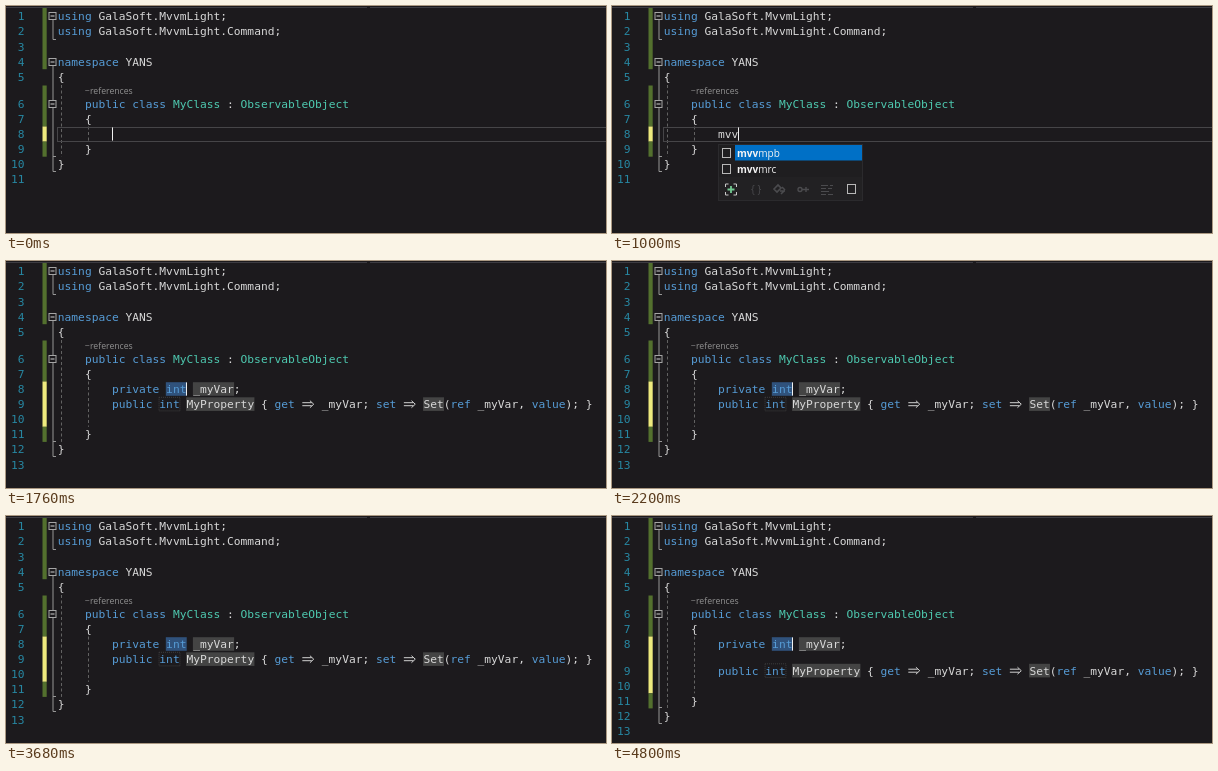
Recreate the animation shown at these times as an HTML page. Size 600 by 227 pixels, loop 4840 ms.

```html
<!DOCTYPE html>
<html lang="en">
<head>
<meta charset="utf-8">
<title>Snippet expansion</title>
<style>
  html, body { margin: 0; width: 100%; height: 100%; overflow: hidden; background: #1c1a1d; }
  svg { display: block; width: 600px; height: 227px; }
  text { white-space: pre; }
  .code { font: 11.25px "DejaVu Sans Mono", "Noto Sans Mono", monospace; font-variant-ligatures: none; }
  .lens { font: 8.7px "Open Sans", "Noto Sans", sans-serif; }
  .item { font: 10px "Open Sans", "Noto Sans", sans-serif; }
  .hit { font-weight: 700; }
</style>
</head>
<body>
<svg id="stage" viewBox="0 0 600 227" width="600" height="227"></svg>
<script>
const LOOP = 4840, BLINK = 650;
const CH = 6.77, LEFT = 51.8, ROW = 15.1, LENS = 12;
const CODE_X = LEFT + 8 * CH;
const TYPED = [[520, 'm'], [600, 'mv'], [680, 'mvv'], [1160, 'mvvmpb']];
const POPUP = [600, 1160];
const EXPAND = 1640, SHIFT = 3960;

const HEAD = [
  'using GalaSoft.MvvmLight;',
  'using GalaSoft.MvvmLight.Command;',
  '',
  'namespace YANS',
  '{',
  '    public class MyClass : ObservableObject',
  '    {'
];
const BODY = [
  '        private int _myVar;',
  '        public int MyProperty { get => _myVar; set => Set(ref _myVar, value); }',
  ''
];
const TAIL = ['    }', '}', ''];

const KEYWORD = /^(using|namespace|public|private|class|int|get|set|ref|value)$/;
const TYPE = /^(MyClass|ObservableObject)$/;
const stage = document.getElementById('stage');

const rect = (x, y, w, h, fill, extra = '') =>
  `<rect x="${x}" y="${y}" width="${w}" height="${h}" fill="${fill}" ${extra}/>`;
const path = (d, color, extra = '') =>
  `<path d="${d}" fill="none" stroke="${color}" ${extra}/>`;
const text = (cls, x, y, fill, s) =>
  `<text class="${cls}" x="${x.toFixed(2)}" y="${y.toFixed(2)}" fill="${fill}">${s}</text>`;

function arrow(x, y) {
  return path(`M${x + 0.8} ${y - 1.4}h9.4M${x + 0.8} ${y + 1.6}h9.4M${x + 8.4} ${y - 3.4}l3.8 3.5l-3.8 3.5`, '#d0d0d0');
}

function codeLine(line, y) {
  let out = '';
  for (const m of line.matchAll(/=>|\w+|[^\w\s=]+/g)) {
    const x = LEFT + m.index * CH, word = m[0];
    if (word === '=>') { out += arrow(x, y); continue; }
    const color = KEYWORD.test(word) ? '#569cd6' : TYPE.test(word) ? '#4ec9b0' : '#d8d8d8';
    out += text('code', x, y + 4, color, word);
  }
  return out;
}

// Vertical centre of a 1-based line
const lineY = (n, shift) => 10.3 + ROW * (n - 1) + (n > 5 ? LENS : 0) + (n > 8 ? shift : 0);

function foldBox(y) {
  const t = Math.round(y) - 3.5;
  return rect(43, t, 7, 7, '#1c1a1d', 'stroke="#a5a5a5"') + path(`M44.5 ${t + 3.5}h4`, '#d0d0d0');
}

function margins(s, last, at) {
  const top = n => at(n) - 7.5, bottom = n => at(n) + 7.6;
  const firstGreen = s.expanded ? 10 : 8;
  const bar = (a, b, c) => rect(36.5, a, 4.2, b - a, c);
  const end = Math.round(bottom(last - 2)) - 0.5;
  const outer = Math.round(bottom(last - 1)) - 0.5;
  const guide = 'stroke-dasharray="3 2.5"';
  return rect(0, 1, 361, 1, '#3d3c42') + rect(364, 1, 236, 1, '#3d3c42') +
    bar(2, bottom(4), '#53702e') +
    bar(79.5, top(8), '#53702e') +
    bar(top(8), bottom(firstGreen), '#eeea7e') +
    bar(bottom(firstGreen), bottom(last - 2), '#53702e') +
    path(`M47 14V33.5H50M47 60V${outer}H50M47 ${end}H50`, '#969696') +
    [1, 4, 6].map(n => foldBox(at(n))).join('') +
    path(`M55.5 79V${bottom(last - 2)}`, '#626262', guide) +
    path(`M82.5 ${top(8)}V${top(last - 2)}`, '#626262', guide);
}

function fields(at) {
  const mark = (n, col, len, fill, extra) =>
    rect(CODE_X + col * CH - 0.3, at(n) - 6.8, len * CH + 0.6, 13.6, fill, extra);
  return mark(8, 8, 3, '#30527c') +
    mark(8, 12, 6, '#444444') +
    mark(9, 7, 3, 'none', 'stroke="#3d3d3d" stroke-dasharray="1 1"') +
    mark(9, 11, 10, '#444444') +
    mark(9, 46, 3, '#444444');
}

function popup(typed) {
  const icon = (x, y) => rect(x, y, 8, 9, 'none', 'stroke="#b8b8b8"');
  const row = (y, rest) =>
    icon(110.5, y - 8) +
    text('item', 125, y, '#f4f4f4', `<tspan class="hit">${typed}</tspan>${rest.slice(typed.length)}`);
  const dim = '#4b4b4e';
  return rect(106.5, 138.5, 144, 56, '#1f1e20', 'stroke="#2b2a2d"') +
    rect(107, 171, 143, 23, '#222123') +
    rect(123, 139, 127, 15.5, '#0070c6') +
    row(150.5, 'mvvmpb') + row(166.5, 'mvvmrc') +
    path('M113.5 181v-3h3M121.5 178h3v3M124.5 186v3h-3M116.5 189h-3v-3', '#c8c8c8') +
    path('M115.5 183.5h7M119 180v7', '#73c991', 'stroke-width="1.8"') +
    text('item', 139, 187, dim, '{ }') +
    path('M162 183l4-4l3 3l-4 4zM168 185h5M169 188l3-3M170 181l3 3', dim, 'stroke-width="1.6"') +
    path('M190 183.5h7M194 181v5', dim, 'stroke-width="1.4"') +
    `<circle cx="188" cy="183.5" r="2" fill="none" stroke="${dim}" stroke-width="1.4"/>` +
    path('M209 179.5h7M218 179.5h3M209 182.5h5M216 182.5h4M209 185.5h8M209 188.5h5M216 188.5h5', dim) +
    icon(235.5, 178.5);
}

function draw(s) {
  const at = n => lineY(n, s.shift);
  const lines = HEAD.concat(s.expanded ? BODY : ['        ' + s.typed], TAIL);
  const col = s.expanded ? 11 : s.typed.length;
  let out = margins(s, lines.length, at);
  // The current line is outlined only while nothing is selected
  out += s.expanded ? fields(at) : rect(51.5, 121.5, 560, 14, 'none', 'stroke="#464548"');
  lines.forEach((line, i) => {
    const num = String(i + 1), y = at(i + 1);
    out += text('code', 18.6 - num.length * CH, y + 4, '#2787a2', num) + codeLine(line, y);
  });
  out += text('lens', 79, 88, '#929292', '−references');
  if (s.caret) out += rect(Math.round(CODE_X + col * CH), at(8) - 6.6, 1, 13.2, '#f0f0f0');
  if (s.popup) out += popup(s.typed);
  stage.innerHTML = out;
}

function stateAt(t) {
  const step = TYPED.filter(k => k[0] <= t).pop() || [0, ''];
  const expanded = t >= EXPAND;
  const since = t - (expanded ? EXPAND : step[0]);
  return {
    typed: step[1],
    expanded,
    shift: t >= SHIFT ? 11.5 : 0,
    popup: t >= POPUP[0] && t < POPUP[1],
    caret: Math.floor(since / BLINK) % 2 === 0
  };
}

let shown = '';
function frame() {
  const s = stateAt(performance.now() % LOOP);
  const key = JSON.stringify(s);
  if (key !== shown) { draw(s); shown = key; }
  requestAnimationFrame(frame);
}
frame();
</script>
</body>
</html>
```
